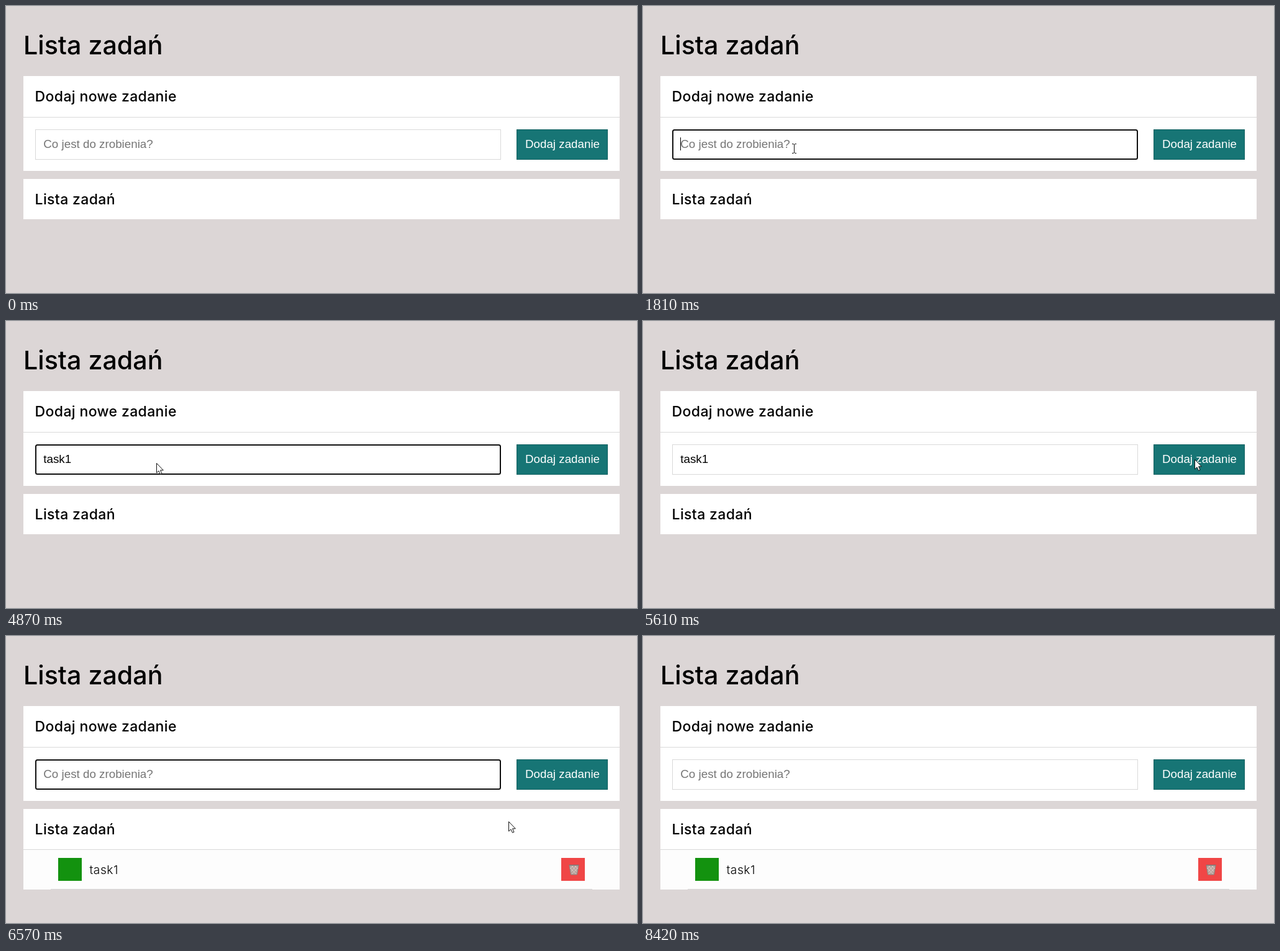
Recreate the animation shown at these times as an HTML page. Size 1016 by 463 pixels, loop 8470 ms.

```html
<!DOCTYPE html>
<html lang="pl">
<head>
<meta charset="utf-8">
<title>Lista zadań</title>
<style>
  html, body { margin: 0; width: 100%; height: 100%; overflow: hidden; background: #dcd6d6; }
  svg { display: block; }
  text { white-space: pre; }
  .title { font: 500 41.2px Inter, sans-serif; }
  .head { font: 500 23px Inter, sans-serif; letter-spacing: .36px; }
  .item { font: 300 19.2px Inter, sans-serif; letter-spacing: .5px; }
  .form { font: 18.8px "Liberation Sans", Arial, sans-serif; }
</style>
</head>
<body>
<svg width="1016" height="463" viewBox="0 0 1016 463">
  <rect width="1016" height="463" fill="#dcd6d6"/>
  <text class="title" x="28" y="78">Lista zadań</text>

  <path fill="#fff" d="M28 113h960v153H28zM28 279h960v65H28z"/>
  <path fill="#d9d9d9" d="M28 179h960v1H28z"/>
  <text class="head" x="46.6" y="154">Dodaj nowe zadanie</text>
  <text class="head" x="46.6" y="320">Lista zadań</text>

  <rect id="plain" x="47.5" y="199.5" width="749" height="48" fill="#fff" stroke="#d9d9d9"/>
  <rect id="ring" x="48" y="200" width="748" height="47" rx="2.5" fill="#fff" stroke="#101010" stroke-width="2"/>
  <text id="hint" class="form" x="60.3" y="229" fill="#757575">Co jest do zrobienia?</text>
  <text id="typed" class="form" x="60.3" y="229"></text>
  <rect id="caret" y="212" width="1" height="21"/>

  <rect x="822.5" y="199.5" width="146" height="48" fill="#177575" stroke="#106060"/>
  <text class="form" x="896" y="229" fill="#fff" text-anchor="middle">Dodaj zadanie</text>

  <g id="task">
    <path fill="#fdfdfd" d="M28 344h960v65H28z"/>
    <path fill="#d9d9d9" d="M28 344h960v1H28zM72 408h872v1H72z"/>
    <path fill="#13920f" d="M84 358h38v37H84z"/>
    <text class="item" x="134.5" y="384">task1</text>
    <path fill="#f04646" d="M894 358h38v37h-38z"/>
    <path fill="#b9a29c" stroke="#8b8581" d="M907 370h15l-2.5 15h-10z"/>
    <path fill="none" stroke="#dcd2cd" stroke-width=".8" d="M908 374l10 10M911 371l8 9M916 371l4 4M921 374l-10 10M918 371l-8 9M913 371l-4 4"/>
    <path fill="none" stroke="#777" d="M906.5 369.5h16"/>
  </g>

  <g id="pointer">
    <path id="arrow" fill="#fff" stroke="#111" d="M.5 .5V16L4 12.8 6.5 18.3 9 17.2 6.6 11.8H11.3Z"/>
    <path id="beam" fill="none" stroke="#111" d="M-3 -7.5H-1L.5 -6.5 2 -7.5H4M.5 -6.5V6.5M-3 7.5H-1L.5 6.5 2 7.5H4"/>
  </g>
</svg>
<script>
const LOOP = 8470, TICK = 66.85, BLINK = 532;
const FOCUS = 1610, PRESS = 5610, ADDED = 5750, BLUR = 8420;
const WORD = 'task1', KEYS = [2600, 2730, 3000, 3200, 4270];

const $ = id => document.getElementById(id);
const show = (id, on) => $(id).setAttribute('visibility', on ? 'visible' : 'hidden');

const glide = (start, end, x, y, bend = 0) => ({ start, end, x, y, bend });
const glides = [
  glide(330, 1000, 242, 233),
  glide(1540, 1800, 243, 230),
  glide(3600, 3740, 241, 175),
  glide(4460, 4475, 241, 211),
  glide(4860, 4875, 242, 229),
  glide(4885, PRESS, 888, 223, -40),
  glide(6130, 7215, 762, 344),
  glide(7225, 7870, 952, 455)
];

// Each glide eases out from where the last one ended, bowed by its bend.
function pointerAt(t) {
  let x = 777, y = 405;
  for (const g of glides) {
    if (t < g.start) break;
    const k = Math.min(1, (t - g.start) / (g.end - g.start));
    const e = k * (2 - k);
    x += (g.x - x) * e;
    y += (g.y - y) * e + g.bend * Math.sin(Math.PI * e);
  }
  return [Math.round(x), Math.round(y)];
}

function drawField(t) {
  const added = t >= ADDED;
  const focused = t >= FOCUS && t < BLUR && !(t >= PRESS && !added);
  const typed = added ? '' : WORD.slice(0, KEYS.filter(k => t >= k).length);
  const lastEdit = [FOCUS, ...KEYS, ADDED].filter(k => t >= k).pop();

  $('typed').textContent = typed;
  show('hint', !typed);
  show('plain', !focused);
  show('ring', focused);
  show('caret', focused && Math.floor((t - lastEdit) / BLINK) % 2 === 0);
  $('caret').setAttribute('x', Math.floor(60.3 + (typed ? $('typed').getComputedTextLength() : 0)));
  show('task', added);
}

function drawPointer(t) {
  const visible = t >= 330 && t < 7940;
  const [x, y] = pointerAt(t);
  const beam = t < 3600 && x > 47 && x < 797 && y > 199 && y < 248;
  $('pointer').setAttribute('transform', `translate(${x} ${y})`);
  show('arrow', visible && !beam);
  show('beam', visible && beam);
}

const start = performance.now();
function frame() {
  const t = (performance.now() - start) % LOOP;
  // The screen refreshes in fixed steps.
  const step = Math.floor((t + 20) / TICK) * TICK;
  drawField(step + 5);
  drawPointer(step);
  requestAnimationFrame(frame);
}
frame();
</script>
</body>
</html>
```
